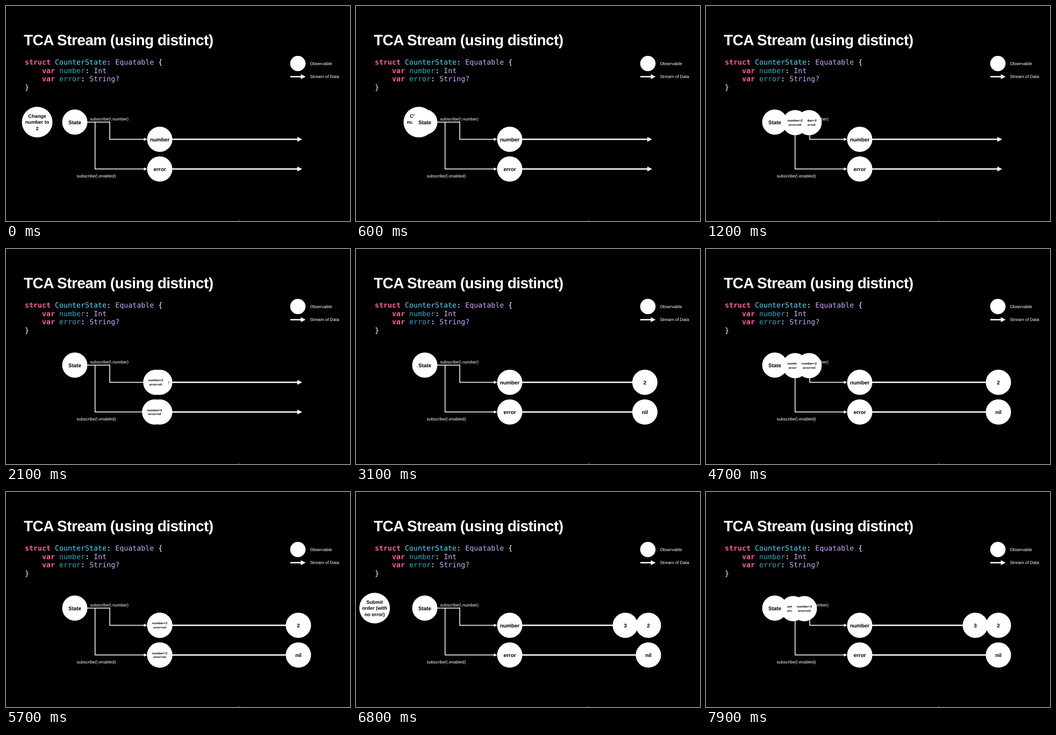
Animation, 640 px wide and 400 px high, one loop 8000 ms. Source, as an HTML page:

```html
<!DOCTYPE html>
<html lang="en">
<head>
<meta charset="utf-8">
<title>TCA Stream</title>
<style>
  html, body { margin: 0; width: 100%; height: 100%; overflow: hidden; background: #000; }
  svg { display: block; width: 640px; height: 400px; }
  text { font-family: "Liberation Sans", Arial, sans-serif; fill: #fff; white-space: pre; text-rendering: geometricPrecision; }
  .title { font-size: 28px; font-weight: bold; letter-spacing: -0.02em; }
  .code text { font-family: "DejaVu Sans Mono", Menlo, monospace; font-size: 13.3px; }
  .keyword { fill: #fc5fa3; font-weight: bold; }
  .declared { fill: #5dd8ff; }
  .member { fill: #41a1c0; }
  .type { fill: #d0a8ff; }
  .label { font-size: 8.05px; }
  .node text { fill: #000; font-weight: bold; text-anchor: middle; }
  .wire { fill: none; stroke: #fff; stroke-width: 1.5; }
  .stream { fill: none; stroke: #fff; stroke-width: 2.6; }
</style>
</head>
<body>
<svg id="stage" viewBox="0 0 640 400">
  <rect width="640" height="400"/>
  <text class="title" x="33" y="73.4">TCA Stream (using distinct)</text>
  <g class="code">
    <text x="35" y="109.3"><tspan class="keyword">struct</tspan> <tspan class="declared">CounterState</tspan>: <tspan class="type">Equatable</tspan> {</text>
    <text x="35" y="124.7">    <tspan class="keyword">var</tspan> <tspan class="member">number</tspan>: <tspan class="type">Int</tspan></text>
    <text x="35" y="140.1">    <tspan class="keyword">var</tspan> <tspan class="member">error</tspan>: <tspan class="type">String?</tspan></text>
    <text x="35" y="155.5">}</text>
  </g>
  <circle cx="543" cy="107" r="14.3" fill="#fff"/>
  <text class="label" x="565.5" y="110">Observable</text>
  <text class="label" x="565.5" y="134.3">Stream of Data</text>
  <path class="wire" d="M151 216H193V248H258M165.7 216V303.3H258"/>
  <text class="label" x="156.5" y="213">subscribe(\.number)</text>
  <text class="label" x="131.5" y="319">subscribe(\.enabled)</text>
  <path class="stream" d="M309 248H544M309 303.3H544M529 131.5H550"/>
  <rect x="432" y="399" width="2" height="1" fill="#888"/>
</svg>
<script>
const LOOP = 8000, STEP = 100;
const STATE = { x: 128, y: 216 };
const COPY_Y = 217;
const TARGET_X = 286;
const CHANNELS = {
  error: { turnX: 165.7, y: 303.3, outMs: 500 },
  number: { turnX: 192, y: 248, outMs: 530 },
};

// Times: action enters and leaves, copies go out of State, values are emitted.
const ROUNDS = [
  { action: ["Change", "number to", "2"], number: 2, order: ["number", "error"],
    enter: -1000, leave: 230, out: 690, emit: 2660, restX: 544, values: { number: "2", error: "nil" } },
  { action: ["Change", "number to", "3"], number: 3, order: ["error", "number"],
    enter: 3160, leave: 3730, out: 4190, emit: 6130, restX: 501, values: { number: "3" } },
  { action: ["Submit", "order (with", "no error)"], number: 3, order: ["error", "number"],
    enter: 6657, leave: 7040, out: 7500, emit: 9600, restX: 501, values: {} },
];

const stage = document.getElementById("stage");

function add(parent, tag, attrs, text) {
  const el = document.createElementNS("http://www.w3.org/2000/svg", tag);
  for (const key in attrs) el.setAttribute(key, attrs[key]);
  if (text) el.textContent = text;
  parent.appendChild(el);
  return el;
}

function addLines(parent, lines, size, leading) {
  const group = add(parent, "g", { "font-size": size });
  lines.forEach((line, i) => {
    const y = (i - (lines.length - 1) / 2) * leading + size * 0.36;
    add(group, "text", { y }, line);
  });
  return group;
}

function addNode(r, lines, size, leading) {
  const node = add(stage, "g", { class: "node" });
  add(node, "circle", { r, fill: "#fff" });
  node.lines = addLines(node, lines, size, leading);
  return node;
}

function addHead(x, y, length, half) {
  add(stage, "path", { d: `M${x} ${y}l${-length} ${-half}v${2 * half}z`, fill: "#fff" });
}

function place(node, x, y, opacity = 1) {
  node.setAttribute("transform", `translate(${x} ${y})`);
  node.setAttribute("opacity", opacity);
}

const clamp = p => Math.min(1, Math.max(0, p));
const progress = (t, start, ms) => clamp((t - start) / ms);
const easeInOut = p => (1 - Math.cos(Math.PI * p)) / 2;
const easeOut = p => 1 - (1 - p) ** 3;
const glide = (t, start, ms) => easeInOut(progress(t, start, ms));

addHead(557.5, 131.5, 9, 4.5);
for (const { y } of Object.values(CHANNELS)) {
  addHead(262.5, y, 6, 3);
  addHead(551, y, 9, 4.5);
}
for (const name in CHANNELS) {
  place(addNode(23.5, [name], 9.9, 0), TARGET_X, CHANNELS[name].y);
}

for (const round of ROUNDS) {
  round.actionNode = addNode(28.5, round.action, 9.1, 11.3);
  round.copies = round.order.map(name => {
    const node = addNode(23.5, [`number=${round.number}`, "error=nil"], 5.8, 7.5);
    const value = round.values[name];
    if (value) node.value = addLines(node, [value], 9.9, 0);
    return { node, ...CHANNELS[name] };
  });
}
place(addNode(23.5, ["State"], 9.9, 0), STATE.x, STATE.y);

function drawAction(round, t) {
  const x = -30 + 88 * easeOut(progress(t, round.enter, 400))
    + 70 * glide(t, round.leave, 500);
  const shown = t >= round.enter && t < round.leave + 500;
  place(round.actionNode, x, STATE.y, shown ? 1 : 0);
}

function drawCopy(round, { node, turnX, y, outMs }, t) {
  const right = round.out + 1000;
  const fade = progress(t, right + 500, round.emit - right - 500);
  let x = STATE.x + (turnX - STATE.x) * glide(t, round.out, outMs)
    + (TARGET_X - turnX) * glide(t, right, 500);
  // State hides the copy until it starts to move out.
  let opacity = t > round.out ? 1 : 0;
  if (node.value) {
    x += (round.restX - TARGET_X) * glide(t, round.emit, 490);
    node.lines.setAttribute("opacity", 1 - fade);
    node.value.setAttribute("opacity", fade);
  } else {
    opacity *= 1 - fade;
  }
  place(node, x, COPY_Y + (y - COPY_Y) * glide(t, round.out + 510, 490), opacity);
}

function draw(t) {
  for (const round of ROUNDS) {
    drawAction(round, t);
    for (const copy of round.copies) drawCopy(round, copy, t);
  }
}

const start = performance.now();
function tick() {
  const t = (performance.now() - start) % LOOP;
  draw(Math.floor(t / STEP) * STEP);
  requestAnimationFrame(tick);
}
tick();
</script>
</body>
</html>
```
